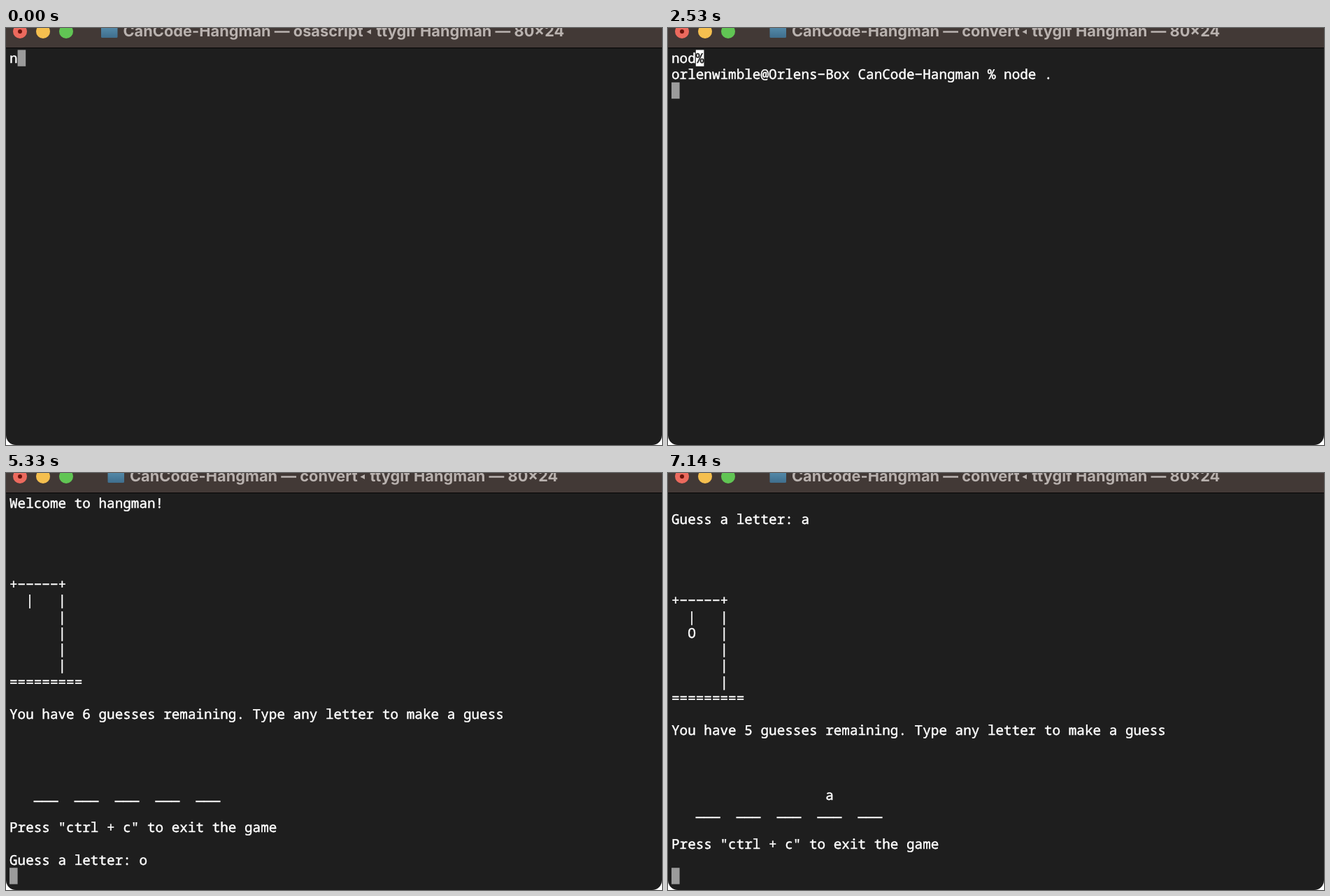
An HTML page that plays this animation: 938 px wide and 597 px high, repeating every 8000 ms.

```html
<!DOCTYPE html>
<html lang="en">
<head>
<meta charset="utf-8">
<title>Hangman terminal</title>
<style>
  html, body { margin: 0; width: 100%; height: 100%; overflow: hidden; background: #fff; }
  svg { display: block; width: 938px; height: 597px; }
  text { white-space: pre; text-rendering: geometricPrecision; }
  #title text { font: 700 21.8px Inter, sans-serif; fill: #b9b2af; }
  #title polygon { fill: #b9b2af; }
  .mono text { font: 500 19.327px "Noto Sans Mono", monospace; fill: #fff; stroke: #fff; stroke-width: 0.45px; }
  .mono .dark { fill: #1e1e1e; stroke: #1e1e1e; }
  #cursor { fill: #9b9b9b; }
</style>
</head>
<body>
<svg viewBox="0 0 938 597">
  <defs>
    <clipPath id="window"><rect y="-40" width="938" height="637" rx="14"/></clipPath>
    <linearGradient id="folder" x2="0" y2="1">
      <stop offset="0.4" stop-color="#5287a6"/>
      <stop offset="1" stop-color="#3f6e8d"/>
    </linearGradient>
  </defs>
  <g clip-path="url(#window)">
    <rect width="938" height="597" fill="#1e1e1e"/>
    <rect width="938" height="28" fill="#423936"/>
    <rect y="28" width="938" height="1" fill="#050505"/>
    <circle cx="20" cy="5" r="10" fill="#ec6a5e"/>
    <circle cx="20" cy="5" r="3" fill="#6b130c"/>
    <circle cx="53" cy="5" r="10" fill="#f5bf4f"/>
    <circle cx="86" cy="5" r="10" fill="#61c554"/>
    <g id="title">
      <g id="titleLeft">
        <rect x="145.5" y="-8" width="23.5" height="22" rx="1.5" fill="url(#folder)"/>
        <text id="process" x="177" y="12"></text>
      </g>
      <g id="titleRight">
        <polygon points="506.5,5.5 513,2 513,9"/>
        <text x="520.5" y="12">ttygif Hangman — 80×24</text>
      </g>
    </g>
    <g class="mono">
      <rect id="cursor" width="11.6" height="23.4"/>
      <g id="lines"></g>
      <g id="mark">
        <rect x="39.8" y="31.4" width="11.6" height="23.4" fill="#fff"/>
        <text class="dark" x="39.8" y="50.2">%</text>
      </g>
    </g>
  </g>
</svg>
<script>
const LOOP = 8000, ROWS = 24, LEFT = 5, CELL = 11.596, LINE = 23.21;
const byId = id => document.getElementById(id);

const PROMPT = 'orlenwimble@Orlens-Box CanCode-Hangman % ';
const ASK = 'Guess a letter: ';

const rows = Array.from({ length: ROWS }, (_, r) => {
  const text = document.createElementNS('http://www.w3.org/2000/svg', 'text');
  text.setAttribute('x', LEFT);
  text.setAttribute('y', 50.2 + r * LINE);
  byId('lines').append(text);
  return text;
});

function board(top, remaining, head, found = '') {
  const post = '      |';
  return {
    ...top,
    6: '+-----+',
    7: '  |   |',
    8: head ? '  O   |' : post,
    9: post, 10: post, 11: post,
    12: '=========',
    14: `You have ${remaining} guesses remaining. Type any letter to make a guess`,
    18: found,
    19: '   ' + Array(5).fill('___').join('  '),
    21: 'Press "ctrl + c" to exit the game'
  };
}

const scrolled = screen => Object.fromEntries(
  Object.entries(screen).filter(([r]) => r > 0).map(([r, s]) => [r - 1, s]));
const asked = (screen, letter) => ({ ...screen, 23: ASK + letter });

// The cursor sits after the text of its row.
const step = (at, screen, row, mark = false) => ({ at, screen, row, mark });
const typed = command => ({ 0: 'nod', 1: PROMPT + command });

const start = board({ 0: PROMPT + 'node .', 1: 'Welcome to hangman!' }, 6, false);
const miss = board({ 1: ASK + 'o' }, 5, true);
const hit = board({ 1: ASK + 'a' }, 5, true, ' '.repeat(19) + 'a');

const steps = [
  step(0, { 0: 'n' }, 0),
  step(70, { 0: 'no' }, 0),
  step(180, { 0: 'nod' }, 0),
  step(330, { 0: 'nod' }, 1, true),
  step(530, typed(''), 1, true),
  step(600, typed('nod'), 1, true),
  step(670, typed('node '), 1, true),
  step(730, typed('node .'), 1, true),
  step(2530, typed('node .'), 2, true),
  step(2620, start, 23),
  step(2710, asked(start, ''), 23),
  step(4770, asked(start, 'o'), 23),
  step(5330, scrolled(asked(start, 'o')), 23),
  step(5430, miss, 23),
  step(6810, asked(miss, 'a'), 23),
  step(7040, scrolled(asked(miss, 'a')), 23),
  step(7140, hit, 23)
];

function show({ at, screen, row, mark }) {
  rows.forEach((text, r) => {
    // The minus sign gives the terminal's wide hyphen.
    text.textContent = (screen[r] || '').replace(/ /g, '\u00a0').replace(/-/g, '\u2212');
  });
  byId('cursor').setAttribute('x', LEFT + (screen[row] || '').length * CELL);
  byId('cursor').setAttribute('y', 31.4 + row * LINE);
  byId('mark').style.display = mark ? '' : 'none';

  const early = at < 70;
  byId('process').textContent = 'CanCode-Hangman — ' + (early ? 'osascript' : 'convert');
  byId('titleLeft').setAttribute('transform', `translate(${early ? -9.5 : 0})`);
  byId('titleRight').setAttribute('transform', `translate(${early ? 9 : 0})`);
}

let shown;
const origin = performance.now();
function tick() {
  const t = (performance.now() - origin) % LOOP;
  const current = steps.filter(s => s.at <= t).pop();
  if (current !== shown) show(shown = current);
  requestAnimationFrame(tick);
}
tick();
</script>
</body>
</html>
```
